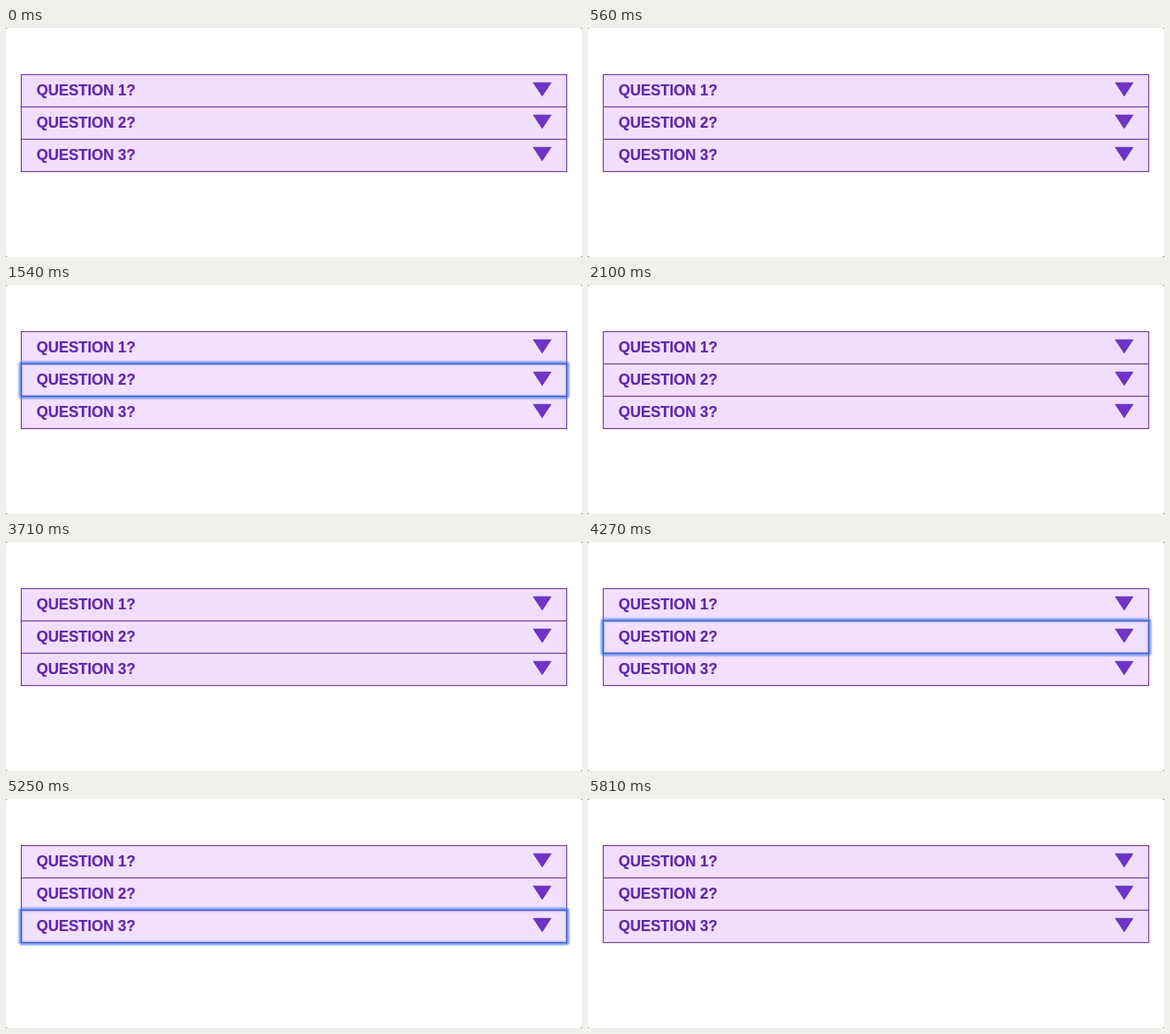
An HTML page that plays this animation: 622x248 px, repeating every 7350 ms.

```html
<!DOCTYPE html>
<html lang="en">
<head>
<meta charset="utf-8">
<style>
  html, body { margin: 0; width: 100%; height: 100%; overflow: hidden; background: #fff; }
  svg { display: block; }
  .row { fill: #f1defc; stroke: #7646a6; stroke-width: 1.15; }
  .active .row { fill: #f2e0fe; }
  text { font: bold 16px "Liberation Sans", Arial, sans-serif; fill: #6026a9; stroke: #6026a9; stroke-width: .2; }
  .arrow { fill: #7033c8; stroke: #5f2aa8; stroke-width: .8; }
  .ring { fill: none; stroke: #4f80ee; }
</style>
</head>
<body>
<svg id="stage" width="622" height="248" viewBox="0 0 622 248">
  <path d="M0 0h1v1h-1zM621 0h1v1h-1zM0 247h1v1h-1zM621 247h1v1h-1z" fill="#777"/>
  <g id="rows"></g>
  <g id="ring" class="ring">
    <rect x="15.5" y="49.5" width="591" height="37" rx="2" stroke-width="6" opacity=".2"/>
    <rect x="15.5" y="49.5" width="591" height="37" rx="2" stroke-width="4" opacity=".35"/>
    <rect x="15.5" y="49.5" width="591" height="37" rx="1" stroke-width="2" opacity=".5"/>
    <rect x="16.5" y="50.5" width="589" height="35" stroke="#4a58bc"/>
  </g>
</svg>
<script>
const PERIOD = 7350, ROW = 35;
// [start ms, focused row], -1 means no focus
const STEPS = [[0, -1], [700, 0], [1330, 1], [1610, 2], [2100, -1],
               [3780, 0], [4200, 1], [5250, 2], [5670, -1]];
const stage = document.getElementById("stage");
const ring = document.getElementById("ring");

document.getElementById("rows").innerHTML = [1, 2, 3].map((n, i) => `
  <g transform="translate(0 ${i * ROW})">
    <rect class="row" x="16.5" y="50.5" width="589" height="${ROW}"/>
    <text x="33" y="73">QUESTION ${n}?</text>
    <path class="arrow" d="M569.5 59.3h19l-9.5 14.4z"/>
  </g>`).join("");

function draw(now) {
  const t = now % PERIOD;
  const focus = STEPS.filter(([start]) => start <= t).pop()[1];
  ring.style.display = focus < 0 ? "none" : "";
  ring.setAttribute("transform", `translate(0 ${focus * ROW})`);
  stage.classList.toggle("active", focus >= 0);
}

function tick() {
  draw(performance.now());
  requestAnimationFrame(tick);
}
tick();
</script>
</body>
</html>
```
